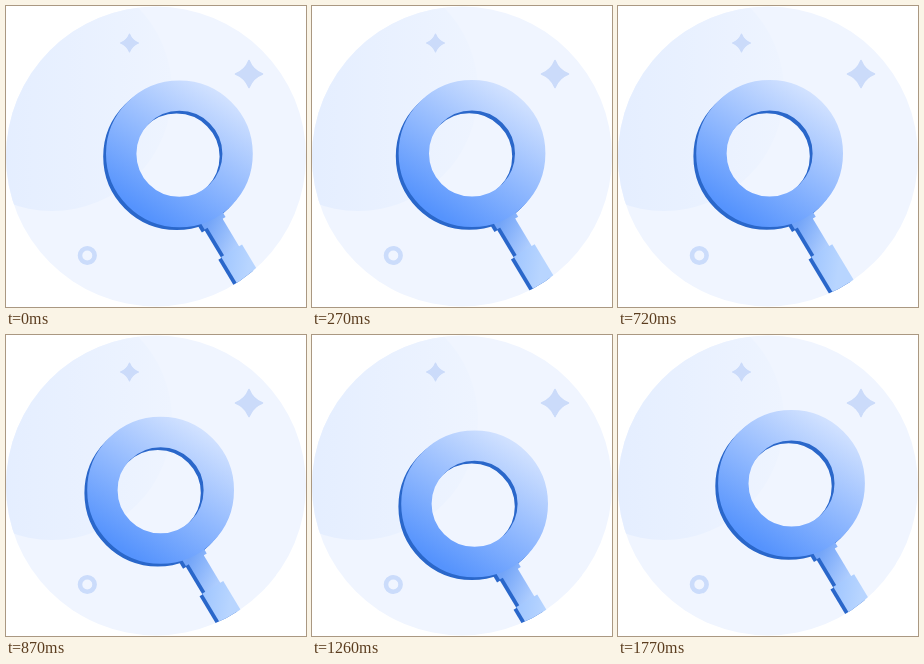
Write an HTML page that moves like this. It is 300 px wide and 301 px high and loops after 1800 ms.

```html
<!DOCTYPE html>
<html lang="en">
<head>
<meta charset="utf-8">
<title>Searching</title>
<style>
  html, body { margin: 0; width: 100%; height: 100%; overflow: hidden; background: #fff; }
  svg { display: block; width: 100vw; height: 100vh; }
</style>
</head>
<body>
<svg viewBox="0 0 300 301">
  <defs>
    <clipPath id="disc"><circle cx="150" cy="150.5" r="150"/></clipPath>
    <linearGradient id="lobe">
      <stop offset=".2" stop-color="#e3edff"/>
      <stop offset="1" stop-color="#eef4ff"/>
    </linearGradient>
    <linearGradient id="rim" gradientUnits="userSpaceOnUse" x1="40" y1="-62" x2="-38" y2="59">
      <stop offset="0" stop-color="#d2e2ff"/>
      <stop offset="1" stop-color="#5593fd"/>
    </linearGradient>
    <linearGradient id="neck" gradientUnits="userSpaceOnUse" x1="-15" y1="76" x2="5" y2="106">
      <stop offset="0" stop-color="#72a4f8"/>
      <stop offset="1" stop-color="#aecdfe"/>
    </linearGradient>
    <linearGradient id="grip" gradientUnits="userSpaceOnUse" x1="-17" y1="110" x2="5" y2="128">
      <stop offset="0" stop-color="#a0c6ff"/>
      <stop offset="1" stop-color="#b8d5ff"/>
    </linearGradient>
    <path id="star" d="M0-1Q.28-.28 1 0Q.28.28 0 1Q-.28.28-1 0Q-.28-.28 0-1Z"
      fill="#cbdbfa" stroke="#cbdbfa" stroke-width=".12" stroke-linejoin="round"/>
    <circle id="ring" r="58.200" fill="none" stroke-width="30.400"/>
    <path id="shaft" d="M-14 64H3.500V112H-14Z"/>
    <path id="collar" d="M-17.400 64H7V78H-17.400Z"/>
    <path id="handle" d="M-17.400 110H7V190H-17.400Z"/>
  </defs>
  <g clip-path="url(#disc)">
    <rect width="300" height="301" fill="#f0f5ff"/>
    <circle cx="46" cy="85" r="120" fill="url(#lobe)"/>
    <use href="#star" transform="translate(123.500 37) scale(9)"/>
    <use href="#star" transform="translate(243 68) scale(13.500)"/>
    <circle cx="81.300" cy="249.500" r="7.300" fill="none" stroke="#cbdcfb" stroke-width="4.600"/>
    <g id="glass">
      <g transform="translate(-2.800 2.800)" fill="#2a67ca" stroke="none">
        <g transform="rotate(-31)">
          <use href="#shaft"/>
          <use href="#collar"/>
          <use href="#handle"/>
        </g>
        <use href="#ring" stroke="#2a67ca"/>
      </g>
      <g transform="rotate(-31)">
        <use href="#shaft" fill="url(#neck)"/>
        <use href="#collar" fill="url(#neck)"/>
        <use href="#handle" fill="url(#grip)"/>
      </g>
      <use href="#ring" stroke="url(#rim)"/>
    </g>
  </g>
</svg>
<script>
  const LOOP = 1800, STEP = 30;
  // time, x, y of the lens centre
  const keys = [
    [0, 173.4, 147.8], [270, 160, 147.5], [540, 150, 147], [720, 151.6, 147.5],
    [1020, 157.9, 163.4], [1260, 162.6, 168.8], [1500, 168.9, 160],
    [1620, 171.7, 153.9], [1770, 173.5, 148.5]
  ];
  const glass = document.getElementById('glass');

  function key(i) {
    const n = keys.length, lap = Math.floor(i / n);
    const [t, x, y] = keys[i - lap * n];
    return [t + lap * LOOP, x, y];
  }

  function slope(i, axis) {
    const a = key(i - 1), b = key(i + 1);
    return (b[axis] - a[axis]) / (b[0] - a[0]);
  }

  // Smooth closed curve through the keys
  function position(t, axis) {
    let i = 0;
    while (key(i + 1)[0] <= t) i++;
    const a = key(i), b = key(i + 1), d = b[0] - a[0];
    const u = (t - a[0]) / d, v = 1 - u;
    return a[axis] * v * v * (1 + 2 * u) + b[axis] * u * u * (1 + 2 * v)
      + d * u * v * (v * slope(i, axis) - u * slope(i + 1, axis));
  }

  const start = performance.now();
  function draw() {
    const elapsed = Math.max(0, performance.now() - start) % LOOP;
    const t = Math.floor(elapsed / STEP) * STEP;
    glass.setAttribute('transform', `translate(${position(t, 1)} ${position(t, 2)})`);
    requestAnimationFrame(draw);
  }
  draw();
</script>
</body>
</html>
```
